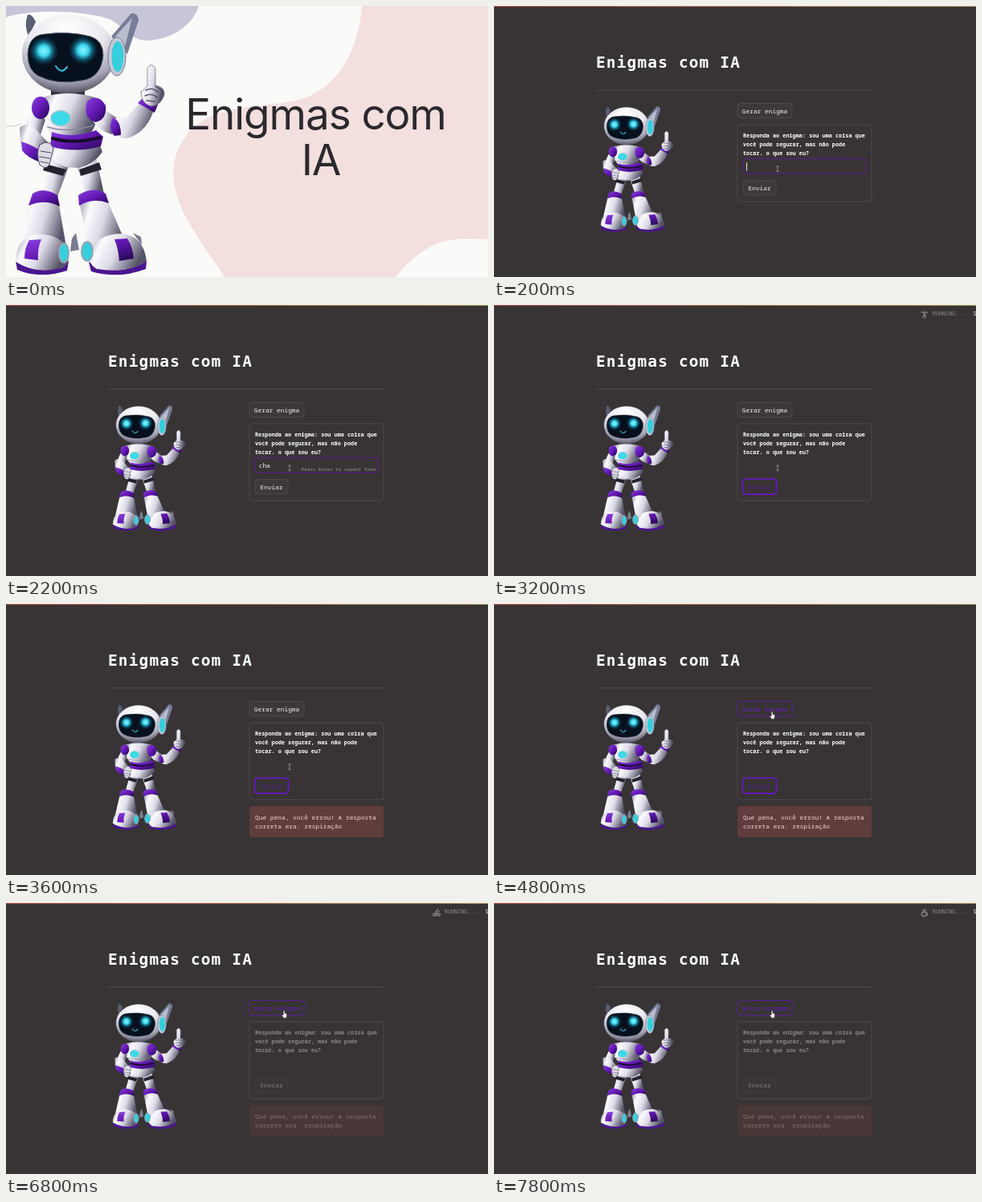
Animation, 600 px wide and 338 px high, one loop 8 s. Source, as an HTML page:

```html
<!DOCTYPE html>
<html lang="pt">
<head>
<meta charset="utf-8">
<title>Enigmas com IA</title>
<style>
  html, body { margin: 0; width: 100%; height: 100%; overflow: hidden; background: #383435; }
  svg { display: block; width: 100vw; height: 100vh; }
  text { font: 500 7.85px "Noto Sans Mono", "DejaVu Sans Mono", monospace; fill: #f4f2f2; white-space: pre; }
  .title { font: 700 19.5px "DejaVu Sans Mono", monospace; letter-spacing: 1.12px; fill: #fff; }
  .small { font-size: 6.85px; }
  .label { font-weight: 600; fill: #fff; }
  .hint { font-size: 5.9px; font-weight: 400; fill: #9b9697; }
  .status { font-weight: 400; fill: #8d8889; }
  .error { fill: #f3d6d3; }
  .cover { font: 430 53px Inter, "Liberation Sans", sans-serif; letter-spacing: -.02em; fill: #2a292d; text-anchor: middle; }
  .box { fill: #383435; stroke: #555051; stroke-width: .8; }
  .btn { fill: #3d3839; }
  .purple { stroke: #6416b4; }
  .violet { fill: #6d1cc0; }

  /* one loop is 8 s, so 2.5% is 200 ms */
  .intro, .field, .caret, .cover-up, .hint, .ring, .run, .alert,
  .hover, .beam, .arrow, .hand { animation: 8s step-end infinite; }
  .intro { animation-name: intro; }
  .field { animation-name: field; }
  .caret { animation-name: caret; }
  .cover-up { animation-name: type; }
  .hint { animation-name: hint; }
  .ring { animation-name: ring; }
  .run { animation-name: run; }
  .alert { animation-name: alert; }
  .hover, .hand { animation-name: hover; }
  .beam { animation-name: beam; }
  .arrow { animation-name: arrow; }
  .fade { animation: fade 8s infinite; }
  .pose { animation: pose .8s calc(var(--i) * .2s - .8s) step-end infinite; }

  @keyframes intro { 0% { opacity: 1 } 2.5% { opacity: 0 } }
  @keyframes field { 0% { opacity: 1 } 35% { opacity: 0 } }
  @keyframes caret { 0% { opacity: 1 } 7.5% { opacity: 0 } 15% { opacity: 1 } 17.5% { opacity: 0 } }
  @keyframes type {
    0% { transform: none }
    17.5% { transform: translateX(4.71px) }
    22.5% { transform: translateX(9.42px) }
    25% { transform: translateX(14.13px) }
    30% { transform: translateX(18.84px) }
    32.5% { transform: translateX(23.55px) }
  }
  @keyframes hint { 0% { opacity: 0 } 17.5% { opacity: 1 } 35% { opacity: 0 } }
  @keyframes ring { 0% { opacity: 0 } 35% { opacity: 1 } 62.5% { opacity: 0 } }
  @keyframes run { 0% { opacity: 0 } 37.5% { opacity: 1 } 45% { opacity: 0 } 67.5% { opacity: 1 } }
  @keyframes alert { 0% { opacity: 0 } 45% { opacity: 1 } }
  @keyframes hover { 0% { opacity: 0 } 60% { opacity: 1 } }
  @keyframes beam { 0% { opacity: 1 } 55% { opacity: 0 } }
  @keyframes arrow {
    0% { opacity: 0; transform: translate(351px, 168px) }
    55% { opacity: 1; transform: translate(351px, 168px) }
    57.5% { opacity: 1; transform: translate(348px, 143px) }
    60% { opacity: 0 }
  }
  @keyframes fade {
    0%, 67.5% { opacity: 1; animation-timing-function: ease-in }
    82.5%, 100% { opacity: .4 }
  }
  @keyframes pose { 0% { opacity: 1 } 25% { opacity: 0 } }
</style>
</head>
<body>
<svg viewBox="0 0 600 338" preserveAspectRatio="none">
  <defs>
    <linearGradient id="bar"><stop stop-color="#b84844"/><stop offset="1" stop-color="#b09a58"/></linearGradient>
    <linearGradient id="shell" x2="1" y2=".35">
      <stop stop-color="#8f8da3"/><stop offset=".28" stop-color="#fbfbfd"/>
      <stop offset=".58" stop-color="#dddbe7"/><stop offset="1" stop-color="#555368"/>
    </linearGradient>
    <radialGradient id="skull" cx=".48" cy=".2" r=".82">
      <stop stop-color="#fff"/><stop offset=".5" stop-color="#e9e9ef"/>
      <stop offset=".8" stop-color="#a5a5b5"/><stop offset="1" stop-color="#4b4b5c"/>
    </radialGradient>
    <linearGradient id="plum" x2="1" y2="1">
      <stop stop-color="#8a3fe0"/><stop offset=".5" stop-color="#6318b4"/><stop offset="1" stop-color="#230650"/>
    </linearGradient>
    <radialGradient id="glow">
      <stop stop-color="#8cf4ff"/><stop offset=".35" stop-color="#41d9f0"/>
      <stop offset=".6" stop-color="#147c98" stop-opacity=".75"/><stop offset="1" stop-color="#0a2a3c" stop-opacity="0"/>
    </radialGradient>

    <g id="robot" stroke-linejoin="round" stroke-linecap="round">
      <!-- fins -->
      <path d="M27 11Q32 9 37 20L28 38Q22 24 27 11Z" fill="#595e74"/>
      <path d="M156 9Q165 9 165 18L151 60L131 38Z" fill="#777d96"/>
      <path d="M157 15L147 55L136 38Z" fill="#b9bed0"/>
      <!-- legs -->
      <path d="M57 190L78 200L64 238L44 236Z" fill="url(#shell)"/>
      <path d="M88 200L112 188L122 234L101 239Z" fill="url(#shell)"/>
      <path d="M49 197L75 204L71 212L46 205ZM91 204L116 195L119 204L93 212Z" fill="#24222e"/>
      <path d="M31 240Q48 232 65 243L76 306L17 302Z" fill="url(#shell)"/>
      <path d="M91 242Q108 231 125 240L151 300L103 307Z" fill="url(#shell)"/>
      <path d="M33 234Q47 225 64 236L67 250Q48 240 28 249Z" fill="url(#plum)"/>
      <path d="M90 236Q107 224 124 234L128 246Q109 238 91 249Z" fill="url(#plum)"/>
      <!-- feet -->
      <path d="M12 318Q43 340 78 318L76 330Q42 341 14 329Z" fill="#4a1590"/>
      <path d="M103 319Q140 340 175 318L174 328Q140 341 106 331Z" fill="#4a1590"/>
      <path d="M12 319Q12 290 37 285Q63 283 76 301Q82 324 68 327Q38 335 12 319Z" fill="url(#shell)"/>
      <path d="M103 307Q114 284 144 284Q171 286 175 318Q152 334 113 328Q102 322 103 307Z" fill="url(#shell)"/>
      <path d="M29 292L44 291Q39 302 40 317L23 315Q23 302 29 292ZM135 291L151 290Q158 301 159 315L141 318Q140 303 135 291Z" fill="url(#plum)"/>
      <path d="M82 290L87 283L91 304L80 306ZM158 283L168 288L169 298Z" fill="#777b90"/>
      <ellipse cx="72" cy="308" rx="6" ry="12" fill="#35cfdd" stroke="#9ba3b4" stroke-width="2"/>
      <ellipse cx="101" cy="306" rx="7" ry="12" fill="#35cfdd" stroke="#9ba3b4" stroke-width="2"/>
      <!-- torso -->
      <path d="M56 102H98V116H56Z" fill="#34323f"/>
      <path d="M60 164L112 161L120 182Q110 197 91 202L75 201Q58 195 53 182Z" fill="url(#shell)"/>
      <path d="M45 114Q77 104 111 114Q118 140 106 158Q80 166 56 159Q37 141 45 114Z" fill="url(#shell)"/>
      <path d="M57 157Q82 166 112 155L121 163L118 175Q86 184 55 175Z" fill="url(#plum)"/>
      <path d="M58 165Q84 173 117 164" fill="none" stroke="#1a0c2c" stroke-width="4"/>
      <path d="M52 151Q78 159 108 149" fill="none" stroke="#8c899e" stroke-width="1.5"/>
      <ellipse cx="68" cy="140" rx="12" ry="9.5" fill="#3bdae6" stroke="#9fc3d0" stroke-width="1.5"/>
      <!-- arm on the hip -->
      <path d="M36 130Q23 142 25 162L41 166L49 142Z" fill="url(#shell)"/>
      <path d="M17 152Q27 142 40 157L56 174L48 191Q26 186 18 170Z" fill="url(#shell)"/>
      <path d="M19 169Q35 174 46 183L43 195Q26 189 20 180Z" fill="url(#plum)"/>
      <path d="M42 173Q55 165 59 178L54 198Q49 205 42 198Q37 184 42 173Z" fill="#dddce6" stroke="#4e4b60"/>
      <path d="M43 181L56 183M42 188L55 190M43 194L53 196" stroke="#4e4b60" fill="none"/>
      <ellipse cx="43" cy="127" rx="11" ry="14" fill="url(#plum)"/>
      <!-- raised arm -->
      <path d="M115 124L140 141L132 160Q113 155 106 139Z" fill="url(#shell)"/>
      <path d="M135 140L150 139L168 119L185 126Q177 157 151 165Q136 166 130 153Z" fill="url(#shell)"/>
      <path d="M133 139Q143 143 143 161L135 162Q126 153 133 139Z" fill="url(#plum)"/>
      <path d="M164 121L170 115L189 123L185 133Z" fill="url(#plum)"/>
      <path d="M168 107L176 100V78Q181 69 186 78V99Q198 101 197 111Q192 125 180 125Q168 121 168 107Z" fill="url(#shell)" stroke="#6a677e" stroke-width=".7"/>
      <path d="M174 105Q182 101 189 107M173 112Q181 108 188 114M186 100L195 106M175 118L185 119" stroke="#4f4b63" fill="none" stroke-width="1.4"/>
      <path d="M101 119Q114 108 124 124Q126 142 111 145Q95 139 101 119Z" fill="url(#plum)"/>
      <!-- head -->
      <ellipse cx="78" cy="60" rx="58" ry="49" fill="url(#skull)"/>
      <ellipse cx="138" cy="63" rx="11" ry="24" fill="#c4c8d6" stroke="#77798e"/>
      <ellipse cx="139" cy="63" rx="7.5" ry="19" fill="#35cfdd"/>
      <path d="M27 60Q28 36 49 35Q78 31 105 38Q121 43 121 62Q118 90 94 93Q63 99 40 87Q27 80 27 60Z" fill="#07101d" stroke="#555a6c"/>
      <circle cx="47" cy="56" r="19" fill="url(#glow)"/>
      <circle cx="96" cy="55" r="19" fill="url(#glow)"/>
      <path d="M62 75Q69 86 76 76" fill="none" stroke="#2fb4d8" stroke-width="2.2"/>
    </g>
  </defs>

  <rect width="600" height="338" fill="#383435"/>
  <rect width="600" height="1" fill="url(#bar)"/>
  <text class="title" x="127" y="76.5">Enigmas com IA</text>
  <path d="M127 104.8H470" stroke="#555051" stroke-width=".8"/>
  <use href="#robot" transform="translate(127.2 121) scale(.484 .479)"/>

  <rect class="box btn" x="303" y="121.5" width="68" height="18.5" rx="3.5"/>
  <text x="308.8" y="133.5">Gerar enigma</text>
  <g class="hover">
    <rect class="box purple" x="303" y="121.5" width="68" height="18.5" rx="3.5"/>
    <text class="violet" x="308.8" y="133.5">Gerar enigma</text>
  </g>

  <rect class="box" x="303" y="148" width="167" height="96" rx="3.5"/>
  <g class="fade">
    <text class="small label" x="310" y="163.7">Responda ao enigma: sou uma coisa que</text>
    <text class="small label" x="310" y="174.6">você pode segurar, mas não pode</text>
    <text class="small label" x="310" y="185.5">tocar. o que sou eu?</text>
    <rect class="box btn" x="310" y="217.7" width="41" height="18.2" rx="3.5"/>
    <text x="316.5" y="229.8">Enviar</text>
  </g>
  <g class="ring">
    <rect class="box" x="309.5" y="217" width="42" height="19.2" rx="4" style="stroke:#6a14cc;stroke-width:1.7"/>
    <text x="316.5" y="229.8" style="fill:#5c1a98">Enviar</text>
  </g>

  <g class="field">
    <rect class="box purple" x="309.5" y="190.5" width="153.5" height="18.5" rx="3.5"/>
    <text x="314.7" y="203">chama</text>
    <rect class="cover-up" x="314.5" y="194" width="26" height="13" fill="#383435"/>
    <path class="caret" d="M314.6 195V205.5" stroke="#eee"/>
  </g>
  <text class="hint" x="367.8" y="207">Press Enter to submit form</text>

  <g class="alert"><g class="fade">
    <rect x="303" y="252" width="167" height="39" rx="3.5" fill="#5f3d3c"/>
    <text class="error" x="310" y="269">Que pena, você errou! A resposta</text>
    <text class="error" x="310" y="280.3">correta era: respiração</text>
  </g></g>

  <g class="run">
    <g fill="none" stroke="#8d8889" stroke-width="1.3" stroke-linecap="round" stroke-linejoin="round">
      <path class="pose" style="--i:0" d="M535.8 6.6V6.7M532 9.2H539.6M535.8 9.2V12M535 12L534.4 16M536.6 12L537.2 16"/>
      <path class="pose" style="--i:1" d="M538 6.5V6.6M533.5 10L536.7 8.8L538 11L540 11.2M536.7 9L535.3 12.2L537.8 14L537 16.5M535.3 12.2L534.2 14.5L532 14.7"/>
      <path class="pose" style="--i:2" d="M537.5 6.5V6.6M539.5 10.5L536.5 8.8L534.8 11.2L536.5 12.5V14.8M531.7 14.5a1.7 1.7 0 1 0 3.4 0a1.7 1.7 0 1 0-3.4 0M537 14.5a1.7 1.7 0 1 0 3.4 0a1.7 1.7 0 1 0-3.4 0"/>
      <path class="pose" style="--i:3" d="M538 6.6V6.7M534 9L536.8 8.8L535.5 11.6H538.5L539.5 15.5M534.5 11.2A2.7 2.7 0 1 0 537.6 14.5"/>
    </g>
    <text class="small status" x="545.7" y="13.3">RUNNING...</text>
    <text class="small" x="596.4" y="13.3">Stop</text>
  </g>

  <path class="beam" d="M351.4 200H354.6M353 200V206.3M351.4 206.3H354.6" fill="none" stroke="#b9b5b6" stroke-width=".7"/>
  <path class="arrow" d="M0 -4V5L2 3L3.5 6L4.7 5.4L3.4 2.6H6Z" fill="#fff" stroke="#222" stroke-width=".5"/>
  <path class="hand" d="M345.3 134.6Q346.2 133.4 347 134.6V137.4L349.5 138V141.3L348.6 143.4H345.6L343.3 140Q343.6 138.7 345.3 139.7Z" fill="#fff" stroke="#222" stroke-width=".5"/>

  <g class="intro">
    <rect width="600" height="338" fill="#fafaf8"/>
    <path d="M0 0H240C234 21 208 43 174 43C154 42 146 24 128 16C98 6 34 3 0 14Z" fill="#c6c6d8"/>
    <path d="M0 150Q10 151 19 147" fill="none" stroke="#c9c8cc"/>
    <path d="M443 0C440 50 415 106 360 118C310 128 262 122 230 155C200 188 205 225 222 260C238 290 258 316 272 338H485C498 322 525 289 575 290L600 291V0Z" fill="#f3dfde"/>
    <use href="#robot"/>
    <text class="cover" x="385.5" y="153.5">Enigmas com</text>
    <text class="cover" x="392" y="211">IA</text>
  </g>
</svg>
</body>
</html>
```
